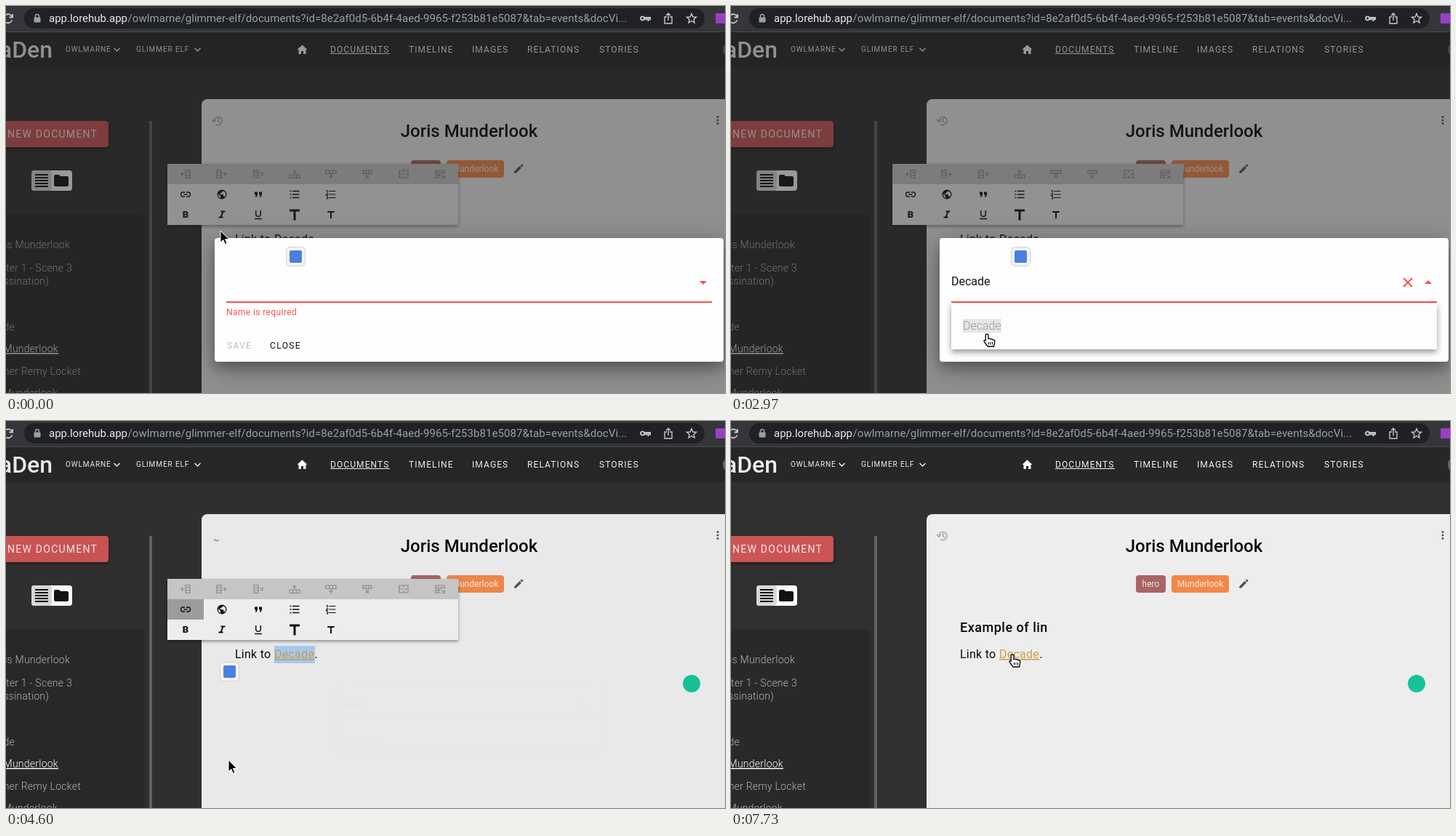
These frames come from a looping animation (989x532 px, 8 s). An HTML page:

```html
<!DOCTYPE html>
<html lang="en">
<head>
<meta charset="utf-8">
<title>Linking a document</title>
<style>
  html, body { margin: 0; width: 100%; height: 100%; overflow: hidden; background: #303030; }
  svg { display: block; width: 989px; height: 532px; font-family: Roboto, sans-serif; }
  text { white-space: pre; }
  .line { fill: none; stroke: currentColor; }
  #bar { filter: drop-shadow(0 2px 2px rgba(0,0,0,.4)); }
  #modal { filter: drop-shadow(0 9px 8px rgba(0,0,0,.22)) drop-shadow(0 8px 18px rgba(0,0,0,.3)); }
  #menu { filter: drop-shadow(0 4px 4px rgba(0,0,0,.4)); }
  #button { filter: drop-shadow(0 2px 2px rgba(0,0,0,.4)); }
</style>
</head>
<body>
<svg id="stage" viewBox="0 0 989 532"></svg>
<script>
const STEP = 148.5, LOOP = 8000, LAST = 52;
const RED = '#f9504e', BLUE = '#1976d2';
const FAMILY = 'Munderlook';

const text = (x, y, s, size, fill, more = '') =>
  `<text x="${x}" y="${y}" font-size="${size}" fill="${fill}" ${more}>${s}</text>`;
const rect = (x, y, w, h, fill, r = 0, more = '') =>
  `<rect x="${x}" y="${y}" width="${w}" height="${h}" rx="${r}" fill="${fill}" ${more}/>`;
const icon = (x, y, d, color, width = 1.5) =>
  `<path transform="translate(${x} ${y})" class="line" d="${d}" color="${color}" stroke-width="${width}"/>`;
const solid = (x, y, d, fill, more = '') =>
  `<path transform="translate(${x} ${y})" d="${d}" fill="${fill}" ${more}/>`;
const spaced = (n, more = '') => `letter-spacing="${n}" ${more}`;
const END = 'text-anchor="end"', MID = 'text-anchor="middle"';

function browser() {
  const grey = '#c4c7cb';
  return rect(0, 0, 989, 36, '#35363a') + rect(25, 3, 936, 28, '#202124', 14) +
    rect(0, 35, 989, 1, '#47484c') +
    icon(3, 17, 'M5.5 -2A6 6 0 1 0 5.5 2.5M6 -6V-1.5H1.5', grey, 1.8) +
    rect(38.5, 15.5, 9, 7, '#9aa0a6', 1) + icon(43, 14, 'M-2.5 2V0a2.5 2.5 0 0 1 5 0V2', '#9aa0a6') +
    text(59, 22, 'app.lorehub.app', 15, '#e8eaed') +
    text(167.5, 22, '/owlmarne/glimmer-elf/documents?id=8e2af0d5-6b4f-4aed-9965-f253b81e5087&amp;tab=events&amp;docVi...',
      15, '#9aa0a6', spaced(.07)) +
    icon(879, 17, 'M-3.5 -2.6a2.6 2.6 0 1 0 .1 0M-1 -1H7V1.2H-1M4.5 1V4', grey, 2) +
    icon(911, 17, 'M-2 -2H-5V7H5V-2H2M0 3V-7M-3 -4L0 -7L3 -4', grey, 1.4) +
    icon(943, 17, 'M0 -6.5L1.9 -2L6.5 -1.7L3 1.4L4 6L0 3.5L-4 6L-3 1.4L-6.5 -1.7L-1.9 -2Z', grey, 1.4) +
    rect(976, 10, 14, 14, '#9a3fc4', 1);
}

function header() {
  const chevron = 'M-4 -2L0 2L4 -2';
  const links = [[446, 'DOCUMENTS'], [554, 'TIMELINE'], [641, 'IMAGES'], [717, 'RELATIONS'], [816, 'STORIES']];
  return rect(0, 36, 989, 48, '#272727') +
    text(64, 71, 'SagaDen', 32, '#ededed', END + ' font-weight="500"') +
    text(82, 63, 'OWLMARNE', 10, '#eee', spaced(.9)) + icon(152.5, 60, chevron, '#eee') +
    text(179, 63, 'GLIMMER ELF', 10, '#eee', spaced(.9)) + icon(263.5, 60, chevron, '#eee') +
    solid(407.5, 60, 'M-1.5 6V2H1.5V6H5V0H7L0 -6.5L-7 0H-5V6Z', '#fff') +
    links.map(([x, s]) => text(x, 64, s, 12, '#f2f2f2', spaced(1.1))).join('') +
    rect(446, 65, 82, 1, '#f2f2f2') + '<circle cx="998" cy="60" r="12" fill="#666"/>';
}

function sidebar() {
  const rows = [[88, 333, 'Joris ' + FAMILY], [91, 365, 'Chapter 1 - Scene 3'], [59, 383, '(Assassination)'],
    [12, 446, 'Decade'], [72, 476, FAMILY], [103, 507, 'Gardener Remy Locket'], [71, 537, FAMILY]];
  return `<g id="button">${rect(-20, 158, 161, 36, '#cc5454', 4)}</g>` +
    text(2, 181, 'NEW DOCUMENT', 14, '#f5e9e9', spaced(1.25)) +
    rect(35, 226, 56, 28, '#fff', 4) + rect(35, 226, 28, 28, '#d8d8d8', 4) +
    icon(49, 240, 'M-9 -8H9M-9 -4H9M-9 0H9M-9 4H9M-9 8H9', '#111', 2) +
    solid(76, 240, 'M-10 -6Q-10 -8 -8 -8H-3L-1 -6H8Q10 -6 10 -4V6Q10 8 8 8H-8Q-10 8 -10 6Z', '#111') +
    rect(-10, 286, 201, 260, '#292929', 6) + rect(197, 158, 4, 374, '#636363') +
    rows.map(([x, y, s]) => text(x, y, s, 14, y === 476 ? '#fff' : '#b4b4b4',
      spaced(.25, END + ' font-weight="300"' + (y === 476 ? ' text-decoration="underline"' : '')))).join('');
}

function card() {
  const history = 'M-5 -1A5.6 5.6 0 1 1 -3 4.6M-8 -2L-5 1.2L-2 -2M.7 -3.4V.6L3.6 2.3';
  return rect(269, 128, 740, 420, '#ededed', 8) +
    `<g id="history">${icon(291, 158, history, '#9a9a9a', 1.3)}</g>` +
    '<circle id="spin" cx="290" cy="158" r="6.3" pathLength="125.66" fill="none" stroke="#9e9e9e" stroke-width="2"/>' +
    text(637, 180, 'Joris ' + FAMILY, 24, '#0a0a0a', MID + ' font-weight="500"') +
    [152.5, 157, 161.5].map(y => `<circle cx="979" cy="${y}" r="1.5" fill="#555"/>`).join('') +
    rect(557, 212, 41, 24, '#a86464', 4) + text(577.5, 228, 'hero', 12, '#f0e4e4', MID) +
    rect(606, 212, 79, 24, '#f28749', 4) + text(645.5, 228, FAMILY, 12, '#fdeee4', MID) +
    solid(705, 224, 'M-6 6L-5.5 3L1.5 -4L4 -1.5L-3 5.5ZM2.4 -4.8L4 -6.2Q5 -6.6 6 -5.5Q6.6 -4.5 6 -4L4.8 -2.4Z', '#555') +
    text(315, 290, 'Example of lin', 18, '#0a0a0a', spaced(.5, 'font-weight="500"')) +
    rect(369, 309, 56, 24, '#a9cbf3', 0, 'id="selection"') +
    text(315, 326, 'Link to', 16, '#0a0a0a', spaced(.25)) +
    text(369, 326, 'Decade', 16, '#0a0a0a', spaced(.25, 'id="word"')) + text(424.5, 326, '.', 16, '#0a0a0a') +
    '<circle cx="943" cy="361" r="12" fill="#15c39a"/>';
}

function toolbar() {
  const faded = [
    'M0 -5.5H6V5.5H0ZM0 -2H6M0 2H6M-7 0H-2M-4.5 -2.5V2.5',
    'M-7 -5.5H-1V5.5H-7ZM-7 -2H-1M-7 2H-1M1.5 0H7M4.2 -2.5V2.5',
    'M-6 -5.5H0V5.5H-6ZM-6 -2H0M-6 2H0M3 -2L7 2M7 -2L3 2',
    'M-7 1H7V5.5H-7ZM-2.3 1V5.5M2.3 1V5.5M-3 -3H3M0 -6V0',
    'M-7 -5H7V-.5H-7ZM-2.3 -5V-.5M2.3 -5V-.5M-3 3H3M0 0V6',
    'M-6 -5H6V-.5H-6ZM-2 -5V-.5M2 -5V-.5M-2 1.5L2 5.5M2 1.5L-2 5.5',
    'M-6 -5H6V5H-6ZM0 -5V-2M0 2V5M-5 0H-1M5 0H1',
    'M1 5H-6V-5H6V0M-6 -2H6M-6 1.5H1M-2 -2V5M2 -2V1M3 2L7 6M7 2L3 6'];
  const ink = '#111', T = 'M-7 -7.5H7V-4.5H1.5V7.5H-1.5V-4.5H-7Z';
  return rect(222, 217, 400, 84, '#f1f1f1') + rect(222, 217, 400, 28, '#c8c8c8') +
    faded.map((d, i) => icon(247 + 50 * i, 231, d, '#8b8b8b', 1.2)).join('') +
    rect(222, 245, 50, 28, '#9e9e9e', 0, 'id="active"') +
    icon(247, 259, 'M-1 -3H-3.5a3 3 0 0 0 0 6H-1M1 -3H3.5a3 3 0 0 1 0 6H1M-2.5 0H2.5', ink, 1.4) +
    `<circle cx="297" cy="259" r="6.5" fill="${ink}"/>` +
    solid(297, 259, 'M-5 -1L-1.8 2.2V5Q-5.4 3.6 -5 -1M2 -4.7Q5.4 -3 5.2 .6Q5 2.4 4 3.4Q3.4 2.4 2 2.4V.6L1 -.1H-2.6V-1.4H-.7V-3.3Q2 -3.2 2 -4.7', '#f1f1f1') +
    solid(347, 259, 'M-5 -3.5H-1V.5L-2.3 3.5H-4.3L-3 .5H-5ZM1 -3.5H5V.5L3.7 3.5H1.7L3 .5H1Z', ink) +
    icon(397, 259, 'M-3 -4.5H6.5M-3 0H6.5M-3 4.5H6.5M-6.5 -4.5H-4.5M-6.5 0H-4.5M-6.5 4.5H-4.5', ink) +
    icon(447, 259, 'M-3 -4.5H6.5M-3 0H6.5M-3 4.5H6.5M-6.5 -5.5H-5V-2.5M-6.5 -1H-4.5L-6.5 1.5H-4.5M-6.5 3H-4.5V6H-6.5', ink, 1.2) +
    text(247, 291, 'B', 13, ink, MID + ' font-weight="900"') +
    icon(297, 286.5, 'M-1.5 -4H4.5M-4.5 4H1.5M1.5 -4L-1.5 4', ink, 2) +
    icon(347, 287, 'M-3.3 -6V-1a3.3 3.3 0 0 0 6.6 0V-6M-5 5.5H5', ink, 1.5) +
    solid(397, 287, T, ink) + `<g transform="translate(447 287) scale(.68)">${solid(0, 0, T, ink)}</g>`;
}

function dialog() {
  return rect(287, 319, 700, 170, '#fefefe', 4) +
    text(303, 384, '', 16, '#161616', 'id="input"') + rect(322, 369, 1, 19, '#222', 0, 'id="caret"') +
    `<g id="field">${icon(931, 380, 'M-6 -6L6 6M6 -6L-6 6', 'currentColor', 2).replace('<path', '<path id="clear"')}` +
    '<path id="arrow" fill="currentColor"/>' + rect(303, 406, 668, 2, 'currentColor') + '</g>' +
    text(303, 425, 'Name is required', 12, RED, spaced(.4, 'id="error"')) +
    rect(295, 453, 51, 28, '#ececec', 4, 'id="hover"') +
    text(304, 471, 'SAVE', 12, '#111', spaced(1.3, 'id="save"')) + text(363, 471, 'CLOSE', 12, '#111', spaced(1.4));
}

const pointer = solid(0, 0, 'M0 0V16L3.8 12.5L6.4 18.5L9 17.4L6.4 11.6H11.5Z', '#000', 'stroke="#fff"');
const hand = solid(0, 0, 'M0 0C1.4 0 2 1 2 2V6.5C3 5.9 4.6 6 5 7C6.2 6.5 7.6 6.8 8 8C9.3 7.6 10.8 8 10.8 9.8C10.8 13 10 14 9.5 17H1C-.5 14.5 -3 12 -4 10C-4.5 8.6 -3 7.8 -1.8 9V2C-1.8 1 -1.2 0 0 0Z',
  '#fff', 'stroke="#000" stroke-width="1.3"') + icon(0, 0, 'M2.5 11V14.5M5 11V14.5M7.5 11V14.5', '#000', 1);

stage.innerHTML = rect(0, 0, 989, 532, '#303030') + header() + sidebar() + card() +
  `<g id="bar">${toolbar()}</g>` + rect(0, 36, 989, 496, '#212121', 0, 'id="dim"') + browser() +
  `<g id="modal">${dialog()}</g><g id="menu"></g>` +
  `<g id="badge">${rect(.5, .5, 26, 26, '#f4f4f4', 5, 'stroke="#d0d0d0"') + rect(5, 5, 17, 17, '#4a80e0', 2)}</g>` +
  `<g id="pointer">${pointer}</g><g id="hand">${hand}</g>`;

const $ = id => document.getElementById(id);
const show = (id, on) => $(id).setAttribute('visibility', on ? 'visible' : 'hidden');
const set = (id, attrs) => { for (const k in attrs) $(id).setAttribute(k, attrs[k]); };

// [step, value] pairs: the newest one that has begun
const current = (list, n) => list.reduce((v, [at, x]) => n >= at ? x : v, list[0][1]);
const typing = [[0, ''], [4, 'D'], [6, 'De'], [10, 'D'], [11, 'De'], [13, 'Dec'], [14, 'Deca'], [15, 'Decad'], [16, 'Decade']];
const menuFade = [[0, 0], [4, .5], [5, .9], [6, 1], [22, .5], [23, .1], [24, 0]];
const people = ['Felinta ' + FAMILY, 'Tolgan ' + FAMILY, 'Gardener Remy Locket'];
// step, x, y
const path = [[0, 295, 309], [1, 314, 323], [16, 314, 323], [18, 333, 395], [20, 352, 451], [26, 352, 451],
  [28, 306, 467], [30, 306, 466], [32, 306, 466], [37, 372, 381], [41, 391, 325], [44, 391, 319], [46, 391, 319], [52, 387, 321]];

function along(n) {
  const i = Math.max(1, path.findIndex(p => p[0] >= n));
  const [a, x, y] = path[i - 1], [b, X, Y] = path[i], u = (n - a) / (b - a);
  return [x + (X - x) * u, y + (Y - y) * u];
}

function drawMenu(n, query) {
  const short = query.length > 2, options = short ? ['Decade'] : people;
  set('menu', { opacity: current(menuFade, n) });
  $('menu').innerHTML = rect(303, 408, 668, short ? 64 : 160, '#fdfdfd') +
    (short ? '' : rect(967, 408, 4, 160, '#505050')) +
    options.map((s, i) => {
      const at = s.toLowerCase().indexOf(query.toLowerCase()), end = at + query.length;
      return rect(0, 430 + 48 * i, 0, 19, '#e6e6e6') + text(319, 445 + 48 * i,
        `${s.slice(0, at)}<tspan fill="#9a9a9a">${s.slice(at, end)}</tspan>${s.slice(end)}`,
        16, '#1c1c1c', `font-weight="300" data-at="${at}"`);
    }).join('');
  if (!query) return;
  for (const t of $('menu').querySelectorAll('text')) {
    const at = +t.dataset.at, mark = t.previousSibling;
    mark.setAttribute('x', t.getStartPositionOfChar(at).x);
    mark.setAttribute('width', t.getSubStringLength(at, query.length));
  }
}

function drawSpinner(ms) {
  const p = Math.max(0, ms - 4390) / 1400 % 1, u = p * 2 % 1, e = u * u * (3 - 2 * u);
  const dash = p < .5 ? 1 + 99 * e : 100, shift = p < .5 ? 15 * e : 15 + 110 * e;
  set('spin', { 'stroke-dasharray': `${dash} 200`, 'stroke-dashoffset': -shift, transform: `rotate(${360 * p} 290 158)` });
}

function render(n) {
  const ms = n * STEP, query = current(typing, n);
  const open = n >= 4 && n < 22, chosen = n >= 22, saved = n >= 30, editing = n < 36;
  const left = (1 - Math.min(1, Math.max(0, (ms - 4400) / 300))) ** 3;

  set('dim', { opacity: .46 * left });
  set('modal', { opacity: left, transform: `translate(637 404) scale(${.5 + left / 2}) translate(-637 -404)` });
  $('input').textContent = query;
  set('caret', { x: chosen ? 357 : query === 'D' ? 313 : 322 });
  show('caret', n >= 4 && n < 8 || n >= 24 && n < 27);
  set('field', { color: chosen ? BLUE : RED });
  show('clear', n >= 4);
  set('arrow', { d: open ? 'M954 382H964L959 377Z' : 'M954 378H964L959 383Z' });
  show('error', !chosen);
  show('hover', n >= 28);
  set('save', { fill: chosen ? '#111' : '#bdbdbd' });
  drawMenu(n, query);

  show('bar', editing);
  show('active', saved && editing);
  show('selection', saved && editing);
  set('word', { fill: saved ? '#c9a24a' : '#0a0a0a', 'text-decoration': saved ? 'underline' : 'none' });
  show('badge', !chosen || n >= 31 && editing);
  set('badge', { transform: `translate(${saved ? 294 : 385} 331)` });

  const loading = saved && n < LAST;
  show('history', !loading);
  show('spin', loading);
  drawSpinner(ms);

  const [x, y] = along(n);
  const linked = open && y > 408 || n >= 22 && n < 24 || n >= 28 && n < 30 || n >= 41;
  show('pointer', !linked);
  show('hand', linked);
  set('pointer', { transform: `translate(${x} ${y})` });
  set('hand', { transform: `translate(${x} ${y})` });
}

let last = -1;
const begin = performance.now();
function frame() {
  const t = (performance.now() - begin) % LOOP;
  const n = Math.min(LAST, Math.floor((t + 6) / STEP));
  if (n !== last) render(last = n);
  requestAnimationFrame(frame);
}
frame();
</script>
</body>
</html>
```
